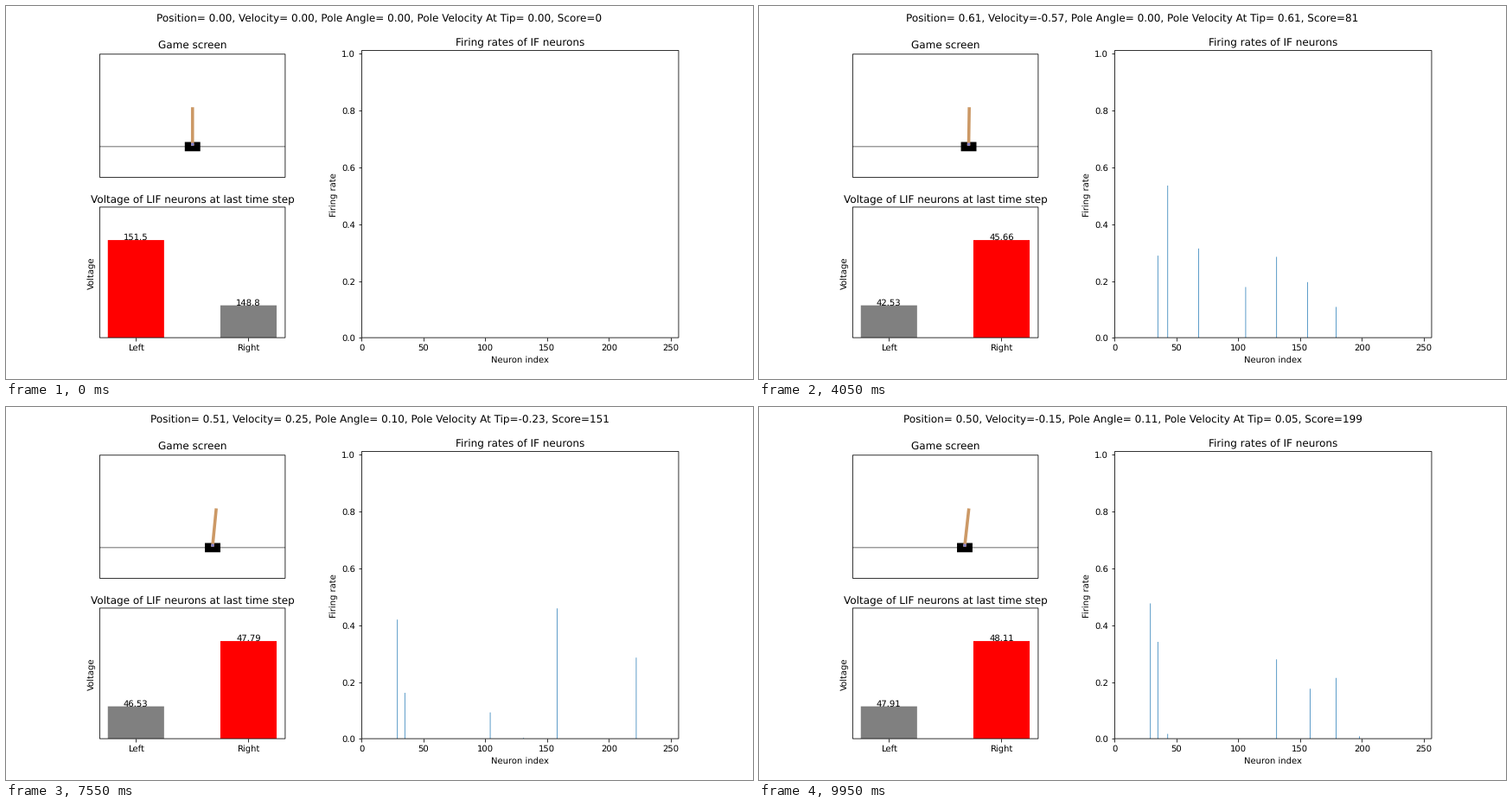
These frames come from a looping animation (864x432 px, 10 s). A matplotlib script:

```python
import numpy as np
import matplotlib.pyplot as plt
from matplotlib.animation import FuncAnimation
from matplotlib.patches import Circle, Polygon, Rectangle

FRAMES, INTERVAL = 200, 50
TAU = 0.02                          # seconds of simulated time per step
KICK = 0.195                        # change of cart speed from one push
SCALE = 125                         # game pixels per unit of position
LAYOUT_GRID = np.array([1200, 600])  # axes borders sit on this finer grid

# Key points of the run: step -> position, velocity, angle, tip velocity
WAYPOINTS = {
    0: (0.00, 0.00, 0.00, 0.00),
    26: (0.17, 1.53, 0.06, -1.01),
    55: (0.76, 0.21, -0.21, 0.11),
    106: (0.62, 0.80, -0.03, -0.82),
    134: (0.57, -0.73, 0.04, 0.78),
    169: (0.70, 0.61, -0.09, -0.64),
    199: (0.50, -0.15, 0.11, 0.05),
}
STEPS = list(WAYPOINTS)

# A sparse population, each neuron tuned to one direction of the state
rng = np.random.default_rng(5)
NEURONS = np.sort(rng.choice(254, 36, replace=False))
TUNING = rng.normal(size=(len(NEURONS), 4))
TUNING /= np.linalg.norm(TUNING, axis=1, keepdims=True)


def hermite(p0, v0, p1, v1, span, s):
    """Position and speed on a cubic that meets both end speeds."""
    a = 3 * (p1 - p0) - span * (2 * v0 + v1)
    b = 2 * (p0 - p1) + span * (v0 + v1)
    pos = p0 + s * (span * v0 + s * (a + s * b))
    vel = v0 + s * (2 * a + 3 * s * b) / span
    return pos, vel


def reference(n):
    k = min(np.searchsorted(STEPS, n, side="right") - 1, len(STEPS) - 2)
    first, last = STEPS[k], STEPS[k + 1]
    start, end = WAYPOINTS[first], WAYPOINTS[last]
    s, span = (n - first) / (last - first), (last - first) * TAU
    x, v = hermite(*start[:2], *end[:2], span, s)
    angle, spin = hermite(*start[2:], *end[2:], span, s)
    return x, v, angle, spin


def simulate():
    """Follow the smooth path with pushes to the left or right only."""
    states, pushes = [], []
    v = 0.0
    for n in range(FRAMES):
        x, v_ref, angle, spin = reference(n)
        if n in WAYPOINTS:
            v = v_ref
        push = 1 if reference(n + 1)[1] > v else -1
        states.append((x, v, angle, spin - 1.5 * (v - v_ref)))
        pushes.append(push)
        v += KICK * push
    return np.array(states), pushes


def firing_rates(state):
    drive = state * [1, 1, 5, 1]
    drive = drive / (np.linalg.norm(drive) + 0.1)
    return np.maximum(1.3 * TUNING @ drive - 0.55, 0)


def voltages(n, state):
    """Higher and lower output voltage, large at first and then settling."""
    x, _, angle, spin = state
    start = np.exp(-n / 8)
    high = 78 - 53 * x - 280 * angle ** 2 + 73.5 * start
    gap = abs(0.6 - 10 * x * spin - 5 * angle + 2.1 * start)
    return high, high - gap


def add_frame(ax):
    ax.spines[:].set_visible(False)
    ax.apply_aspect()
    corners = ax.get_position().get_points()
    low, high = (np.floor(corners * LAYOUT_GRID + 0.5) + 0.5) / LAYOUT_GRID
    fig.add_artist(Rectangle(low, *(high - low), fill=False, ec="black",
                             lw=0.8, snap=False))


states, pushes = simulate()

plt.rcParams["text.hinting"] = "none"
fig = plt.figure(figsize=(12, 6), dpi=72)
title = fig.suptitle("")

# Output voltages
volt_ax = plt.subplot2grid((2, 9), (1, 0), colspan=3)
volt_bars = volt_ax.bar([0, 1], [0.75, 0.25], width=0.5, snap=False)
volt_ax.set(ylim=(0, 1), yticks=[], ylabel="Voltage",
            title="Voltage of LIF neurons at last time step")
volt_ax.set_xticks([0, 1], ["Left", "Right"])
volt_labels = [volt_ax.text(i, 0, "", ha="center") for i in (0, 1)]

# Cart and pole
game_ax = plt.subplot2grid((2, 9), (0, 0), colspan=3)
game_ax.set(xlim=(0, 600), ylim=(0, 400), aspect="equal",
            xticks=[], yticks=[], title="Game screen")
game_ax.plot([0, 600], [101, 101], color="#303030", lw=0.7, snap=False,
             zorder=1)
cart = game_ax.add_patch(
    Rectangle((0, 86), 50, 30, fc="black", lw=0, snap=False, zorder=2))
pole = game_ax.add_patch(
    Polygon(np.zeros((4, 2)), fc=(0.8, 0.6, 0.4), lw=0, snap=False, zorder=3))
axle = game_ax.add_patch(
    Circle((0, 0), 5, fc=(0.5, 0.5, 0.8), lw=0, zorder=4))
POLE = np.array([(-5, -5), (-5, 120), (5, 120), (5, -5)])

# Firing rates
rate_ax = plt.subplot2grid((2, 9), (0, 4), rowspan=2, colspan=5)
rate_bars = rate_ax.bar(NEURONS, np.zeros(len(NEURONS)), width=0.5,
                        color="C0", snap=False)
rate_ax.set(xlim=(0, 256), ylim=(0, 1.01), xlabel="Neuron index",
            ylabel="Firing rate", title="Firing rates of IF neurons")

for ax in (volt_ax, game_ax, rate_ax):
    add_frame(ax)


def draw_game(state):
    x, v, angle, spin = state
    x, angle = x + TAU * v, angle + TAU * spin
    cx, cy = 301 + SCALE * x, 108.5
    c, s = np.cos(angle), np.sin(angle)
    cart.set_x(cx - 25)
    pole.set_xy(POLE @ [[c, -s], [s, c]] + (cx, cy))
    axle.center = cx, cy


def draw_volts(n):
    high, low = voltages(n, states[n])
    winner = 1 if pushes[n] > 0 else 0
    for i, (bar, label) in enumerate(zip(volt_bars, volt_labels)):
        wins = i == winner
        bar.set_height(0.75 if wins else 0.25)
        bar.set_facecolor("red" if wins else "gray")
        label.set_y(bar.get_height())
        label.set_text(str(round(float(high if wins else low), 2)))


def draw_rates(state):
    for bar, rate in zip(rate_bars, firing_rates(state)):
        bar.set_height(rate)


def update(n):
    x, v, angle, spin = states[n]
    title.set_text(f"Position={x: .2f}, Velocity={v: .2f}, "
                   f"Pole Angle={angle: .2f}, "
                   f"Pole Velocity At Tip={spin: .2f}, Score={n}")
    draw_game(states[n])
    draw_volts(n)
    draw_rates(states[n])
    return []


anim = FuncAnimation(fig, update, frames=FRAMES, interval=INTERVAL,
                     repeat=True, repeat_delay=0)
plt.show()
```
